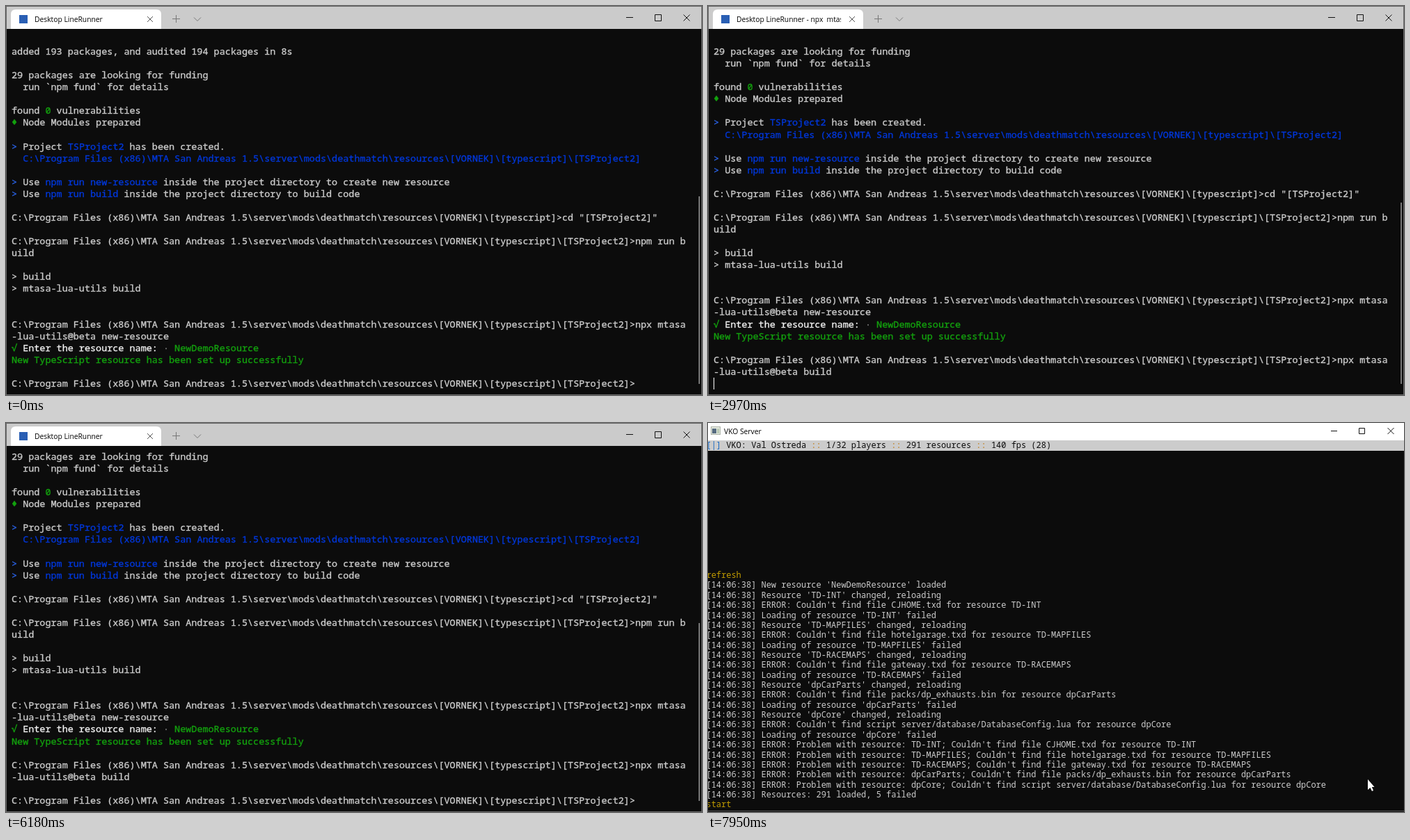
These frames come from a looping animation (1000x560 px, 8 s). An HTML page:

```html
<!DOCTYPE html>
<html lang="en">
<head>
<meta charset="utf-8">
<title>Terminal build</title>
<style>
  html, body { margin: 0; width: 100%; height: 100%; overflow: hidden; background: #0c0c0c; }
  #stage { position: relative; width: 1000px; height: 560px; overflow: hidden; }
  .win { position: absolute; inset: 0; background: #0c0c0c; color: #ccc; overflow: hidden; }
  .win svg { position: absolute; left: 0; top: 0; }
  .rows { position: absolute; white-space: pre; font-family: "Noto Sans Mono", "DejaVu Sans Mono", monospace; }
  .label { position: absolute; white-space: pre; overflow: hidden; color: #000;
           font: 10.3px/16px "Open Sans", "Noto Sans", sans-serif; }
  i { font-style: normal; }
  .blue { color: #0037da; }
  .mark { color: #2a63e6; }
  .green { color: #13a10e; }
  .white { color: #f2f2f2; }
  .dim { color: #767676; }
  .gold { color: #c19c00; }
  .cell { display: inline-block; width: 1ch; color: #13a10e; }

  #shellRows { left: 8px; top: 40px; font-size: 13.46px; -webkit-text-stroke: 0.35px; }
  #shellRows div { height: 17.07px; line-height: 17.07px; }
  #shellTitle { left: 41px; top: 11px; width: 150px; }
  #caret { position: absolute; width: 1px; height: 17px; background: #fff; }
  #thumb { position: absolute; left: 995px; width: 2px; background: #767676; }
  #frame { position: absolute; inset: 0; border: 1px solid #666; box-sizing: border-box; }

  #serverRows { left: -2.5px; top: 25.4px; font-size: 11.97px; }
  #serverRows div { height: 14.36px; line-height: 14.36px; }
  #serverTitle { left: 23px; top: 3.5px; }
  #bar { position: absolute; left: 0; top: 25px; width: 1000px; height: 15px; background: #ccc; }
  #serverRows .status { color: #0c0c0c; }
  .status .gold { color: #c17a10; }
  .status .blue { color: #1769c4; }
  #block { position: absolute; top: 553px; width: 7.2px; height: 3px; background: #f2f2f2; }
</style>
</head>
<body>
<div id="stage">
  <div class="win" id="shell">
    <svg width="1000" height="560" fill="none">
      <path d="M0 0H1000V33H0Z" fill="#cbcbcb"/>
      <path d="M7 33V12Q7 5 14 5H216Q223 5 223 12V33Z" fill="#fff"/>
      <rect x="19" y="13" width="12" height="12" fill="#2a5fb4"/>
      <path d="M203 15L211 23M211 15L203 23" stroke="#555"/>
      <path d="M239 18.5H250M244.5 13V24M270 16.5L275 21.5L280 16.5" stroke="#777"/>
      <path d="M891 16.5H901M932.5 12.5H941.5V21.5H932.5ZM973.5 12.5L982.5 21.5M982.5 12.5L973.5 21.5" stroke="#111"/>
    </svg>
    <div class="label" id="shellTitle"></div>
    <div class="rows" id="shellRows"></div>
    <div id="thumb"></div>
    <div id="caret"></div>
    <div id="frame"></div>
  </div>
  <div class="win" id="server">
    <div id="bar"></div>
    <div class="rows" id="serverRows"></div>
    <div id="block"></div>
    <svg width="1000" height="560" fill="none">
      <path d="M0 0H1000V25H0Z" fill="#fff"/>
      <rect x="4.5" y="5.5" width="13" height="11" fill="#e6ebe0" stroke="#a9b0a5"/>
      <rect x="6" y="8" width="6" height="7" fill="#566b80"/>
      <rect x="13" y="8" width="3" height="7" fill="#b9c9b4"/>
      <path d="M895 11.5H904M935.5 7.5H943.5V15.5H935.5ZM976.5 7L985.5 16M985.5 7L976.5 16" stroke="#111"/>
      <path d="M0 558.5H1000" stroke="#555"/>
      <path d="M948 513V528L951.5 525L954 530L956 529L953.8 524H957.5Z" fill="#fff"/>
    </svg>
    <div class="label" id="serverTitle">VKO Server</div>
  </div>
</div>
<script>
const LOOP = 8000, COLS = 120, ROWS = 30, CELL_W = 8.07, CELL_H = 17.07;
const el = id => document.getElementById(id);
const c = (kind, text) => `<i class="${kind}">${text}</i>`;
const clamp = x => Math.max(0, Math.min(1, x));

// Shell text
const BASE = String.raw`C:\Program Files (x86)\MTA San Andreas 1.5\server\mods\deathmatch\resources\[VORNEK]\[typescript]`;
const PROJECT = BASE + '\\[TSProject2]';
const PROMPT = PROJECT + '>';
const NPX = 'npx mtasa-lua-utils@beta ';

const wrap = text => {
  const out = [];
  for (let i = 0; i <= text.length; i += COLS) out.push(text.slice(i, i + COLS));
  return out;
};

const HISTORY = [
  '',
  'added 193 packages, and audited 194 packages in 8s',
  '',
  '29 packages are looking for funding',
  '  run `npm fund` for details',
  '',
  `found ${c('green', '0')} vulnerabilities`,
  `${c('cell', '♦')} Node Modules prepared`,
  '',
  `${c('mark', '>')} Project ${c('blue', 'TSProject2')} has been created.`,
  '  ' + c('blue', PROJECT),
  '',
  `${c('mark', '>')} Use ${c('blue', 'npm run new-resource')} inside the project directory to create new resource`,
  `${c('mark', '>')} Use ${c('blue', 'npm run build')} inside the project directory to build code`,
  '',
  BASE + '>cd "[TSProject2]"',
  '',
  ...wrap(PROMPT + 'npm run build'),
  '',
  '> build',
  '> mtasa-lua-utils build',
  '', '',
  ...wrap(PROMPT + NPX + 'new-resource'),
  `${c('cell', '√')} ${c('white', 'Enter the resource name:')} ${c('dim', '·')} ${c('green', 'NewDemoResource')}`,
  c('green', 'New TypeScript resource has been set up successfully'),
  ''
];

const FIRST = NPX + 'new-resource', SECOND = NPX + 'build';
const KEYS = [480, 570, 840, 930, 1110, 1140, 1200, 1230, 1290, 1350];
const BUILD_KEYS = [2580, 2640, 2700, 2760, 2820];
const BLINKS = [240, 3240, 3480, 3720, 3960, 4200, 4470, 4710, 4950, 5190, 5430, 5670, 5910, 6180];
const SHELL = 'Desktop LineRunner';
const TITLES = [
  [0, SHELL],
  [2970, SHELL + ' - npx  mtasa-lua-utils@beta build'],
  [3240, 'npm'],
  [3420, 'C:\\WINDOWS\\system32\\cmd.exe'],
  [5730, SHELL]
];
const passed = (times, t) => times.filter(x => x <= t).length;

function typed(t) {
  if (t < 1560) return FIRST.slice(0, passed(KEYS, t));
  if (t < 1800) return FIRST;
  if (t < 2520) return FIRST.slice(0, -1 - Math.min(10, Math.floor((t - 1800) / 51)));
  return SECOND.slice(0, NPX.length + passed(BUILD_KEYS, t));
}

// Server text
const BROKEN = [
  ['TD-INT', 'file CJHOME.txd'],
  ['TD-MAPFILES', 'file hotelgarage.txd'],
  ['TD-RACEMAPS', 'file gateway.txd'],
  ['dpCarParts', 'file packs/dp_exhausts.bin'],
  ['dpCore', 'script server/database/DatabaseConfig.lua']
];
const missing = ([name, file]) => `Couldn't find ${file} for resource ${name}`;
const LOG = [
  "New resource 'NewDemoResource' loaded",
  ...BROKEN.flatMap(b => [
    `Resource '${b[0]}' changed, reloading`,
    'ERROR: ' + missing(b),
    `Loading of resource '${b[0]}' failed`
  ]),
  ...BROKEN.map(b => `ERROR: Problem with resource: ${b[0]}; ${missing(b)}`),
  'Resources: 291 loaded, 5 failed'
].map(line => '[14:06:38] ' + line);

function statusLine(t) {
  const spin = '|/-\\'[(Math.floor((t - 7950) / 60) % 4 + 4) % 4];
  const sep = c('gold', '::');
  return `${c('blue', `[${spin}]`)} VKO: Val Ostreda ${sep} 1/32 players ${sep} 291 resources ${sep} 140 fps (28)`;
}

const shown = {};
function setHTML(id, html) {
  if (shown[id] !== html) el(id).innerHTML = shown[id] = html;
}
const toRows = lines => lines.map(s => `<div>${s}</div>`).join('');

function drawShell(t) {
  const lines = [...HISTORY, ...wrap(PROMPT + typed(t))];
  if (t >= 2970) lines.push('');
  if (t >= 5700) lines.push(PROMPT);
  const extra = lines.length - ROWS;
  setHTML('shellRows', toRows(lines.slice(extra)));
  setHTML('shellTitle', TITLES.filter(x => x[0] <= t).pop()[1]);

  const top = 274 + 4.5 * extra;
  el('thumb').style.top = top + 'px';
  el('thumb').style.height = 544 - top + 'px';
  const caret = el('caret').style;
  caret.left = Math.round(8 + lines[lines.length - 1].length * CELL_W) + 'px';
  caret.top = Math.round(40 + (ROWS - 1) * CELL_H) + 'px';
  caret.visibility = passed(BLINKS, t) % 2 ? 'visible' : 'hidden';
}

function drawServer(t) {
  el('server').style.opacity = clamp((t - 6250) / 710);
  const entered = t >= 7230;
  const hasBar = !entered || t >= 7620;
  const lines = Array(37).fill('');
  if (hasBar) lines[0] = `<span class="status">${statusLine(t)}</span>`;
  if (entered) {
    const count = Math.min(LOG.length, Math.max(0, 2 * Math.floor((t - 7230) / 30)));
    lines[35 - count] = c('gold', 'refresh');
    for (let i = 0; i < count; i++) lines[36 - count + i] = LOG[i];
  }
  const input = entered
    ? 'start'.slice(0, Math.max(0, Math.floor((t - 7800) / 37.5) + 1))
    : 'refresh'.slice(0, Math.max(0, Math.floor((t - 7020) / 30) + 1));
  lines[36] = c('gold', input);
  setHTML('serverRows', toRows(lines));
  el('bar').style.visibility = hasBar ? 'visible' : 'hidden';
  el('block').style.visibility = t < 7260 ? 'visible' : 'hidden';
  el('block').style.left = input.length * 7.18 - 2.5 + 'px';
}

const start = performance.now();
function draw() {
  const t = Math.max(0, performance.now() - start) % LOOP;
  drawShell(t);
  drawServer(t);
  requestAnimationFrame(draw);
}
draw();
</script>
</body>
</html>
```
